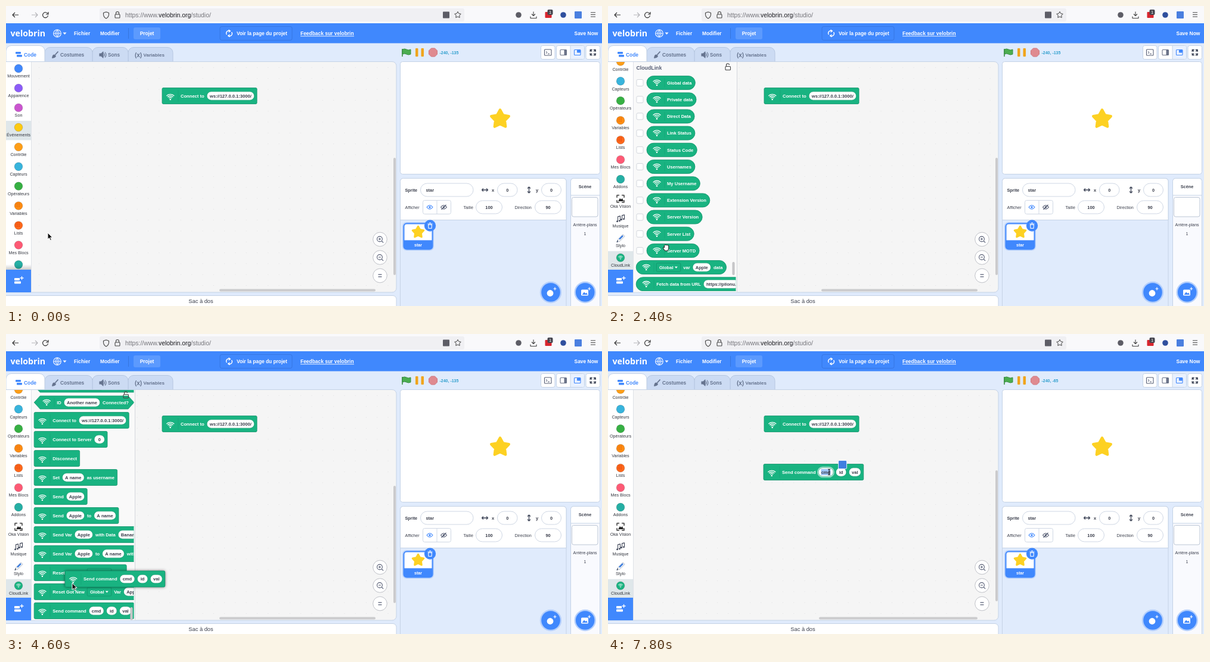
An HTML page with a canvas for the animation above (8 s loop, 1000x504 px).

```html
<!DOCTYPE html>
<html lang="fr">
<head>
<meta charset="utf-8">
<title>Studio de blocs</title>
<style>
html, body { margin: 0; width: 100%; height: 100%; overflow: hidden; }
canvas { display: block; }
</style>
</head>
<body>
<canvas id="stage" width="1000" height="504"></canvas>
<script>
const g = document.getElementById('stage').getContext('2d');
const SANS = '"Liberation Sans", Arial, sans-serif';
const BLUE = '#4088fd', PALE = '#e0ebfc', INK = '#3b3f4c', LINE = '#c5d3e6';
const GREEN = ['#19b381', '#11926a'], YELLOW = ['#fdb903', '#d79c05'], ORANGE = ['#fe9f18', '#d57f0b'];

// Drawing helpers
function paint(shape, fill, stroke, lw = 1) {
  if (fill) { g.fillStyle = fill; g.fill(shape); }
  if (stroke) { g.strokeStyle = stroke; g.lineWidth = lw; g.stroke(shape); }
}
function box(x, y, w, h, r, fill, stroke, lw) {
  const p = new Path2D();
  p.roundRect(x, y, w, h, r);
  paint(p, fill, stroke, lw);
}
function disc(x, y, r, fill, stroke, lw) {
  const p = new Path2D();
  p.arc(x, y, r, 0, 7);
  paint(p, fill, stroke, lw);
}
function path(d, x, y, fill, stroke, lw) {
  g.save();
  g.translate(x, y);
  paint(new Path2D(d), fill, stroke, lw);
  g.restore();
}
function text(s, x, y, size, color, bold = true, align = 'left', font = SANS) {
  g.font = `${bold ? 'bold ' : ''}${size}px ${font}`;
  g.textAlign = align;
  g.fillStyle = color;
  g.fillText(s, x, y + size * .36);
}
function clipped(x, y, w, h, draw) {
  g.save();
  g.beginPath();
  g.rect(x, y, w, h);
  g.clip();
  draw();
  g.restore();
}
function star(x, y, r, fill, stroke, lw) {
  const p = new Path2D();
  for (let i = 0; i < 10; i++) {
    const a = i * Math.PI / 5 - Math.PI / 2, d = i % 2 ? r * .53 : r;
    p.lineTo(x + d * Math.cos(a), y + d * Math.sin(a));
  }
  p.closePath();
  g.lineJoin = 'round';
  paint(p, fill, stroke, lw);
}
const flag = (x, y, k) => {
  g.save();
  g.translate(x, y);
  g.scale(k, k);
  path('M-7-5q4-2 7 0t7 0v8q-4 2-7 0t-7 0z', 0, 0, '#4cae50', '#3b8f43');
  path('M-7-6V7', 0, 0, null, '#3b8f43', 1.6);
  g.restore();
};

// Icons on blocks and in the category list
const icons = {
  wifi(x, y, color = '#fff') {
    disc(x, y + 4, 1.3, color);
    g.strokeStyle = color;
    g.lineWidth = 1.3;
    for (const r of [3.3, 6, 8.7]) {
      g.beginPath();
      g.arc(x, y + 4, r, -2.4, -.74);
      g.stroke();
    }
  },
  music(x, y, color = '#fff') {
    path('M-4 5v-8l4-1v7M3 2v-7l4-1v6', x, y, null, color, 1.1);
    for (const [dx, dy] of [[-5, 5], [-1, 4], [2, 2], [6, 1]]) disc(x + dx, y + dy, 1.4, color);
  },
  pen(x, y) {
    path('M-6 7l2-5 8-8 3 3-8 8z', x, y, '#fff', '#8795ab', .7);
    path('M-2 2l6-6', x, y, null, '#3f7fe0', 2.6);
    path('M-6 7l1.500-3', x, y, null, '#33415c', 1.3);
  }
};

// Blocks: (value)  [menu]  {round menu}
const LEAD = { stack: 31, reporter: 34, bool: 38, hat: 4.5 };
const ICON_X = { stack: 13.7, reporter: 17, bool: 21 };
const TAIL = { stack: 4.5, hat: 4.5, reporter: 6, bool: 9 };
const GAP = 4.4;

function layout(label, lead) {
  g.font = `bold 7.6px ${SANS}`;
  let x = lead;
  const parts = label.match(/\([^)]*\)|\[[^\]]*\]|\{[^}]*\}|[^([{]+/g)
    .map(s => s.trim()).filter(Boolean).map(s => {
      const kind = '([{'.includes(s[0]) ? s[0] : '';
      const word = kind ? s.slice(1, -1) : s;
      let w = g.measureText(word).width;
      if (word === '~') w = 19;
      else if (word === 'flag') w = 10;
      else if (kind === '(') w = Math.max(17.5, w + 9.4);
      else if (kind) w += 17;
      const part = { kind, word, x, w };
      x += w + GAP;
      return part;
    });
  return { parts, end: x - GAP };
}

function block(x, y, shape, [fill, edge], icon, label, edit) {
  const { parts, end } = layout(label, icon ? LEAD[shape] : LEAD.hat);
  const w = end + TAIL[shape], h = shape === 'stack' && icon ? 27 : 23, top = y - h / 2;
  if (shape === 'bool') path(`M10-11H${w - 10}L${w} 0 ${w - 10} 11H10L0 0z`, x, y, fill, edge, .8);
  else if (shape === 'hat') path(`M0-9C8-22 36-22 46-11.500H${w - 2}q2 0 2 2v19q0 2-2 2H2q-2 0-2-2z`, x, y, fill, edge, .8);
  else box(x, top, w, h, shape === 'reporter' ? h / 2 : 2, fill, edge, .8);
  if (icon) {
    icons[icon](x + ICON_X[shape], y + (shape === 'stack' ? 2 : 0));
    g.fillStyle = edge + '66';
    g.fillRect(x + LEAD[shape] - 4.5, top + 4, .8, h - 8);
  }
  parts.forEach(({ kind, word, x: dx, w: pw }) => {
    const px = x + dx;
    if (word === 'flag') return flag(px + 5, y + .5, .6);
    if (kind === '(') {
      box(px, y - 7.2, pw, 14.4, 7.2, word === '~' ? '#4fd0a8' : '#fff', edge, .6);
      if (word === '~') return box(px + 1, y - 6.2, pw - 2, 12.4, 6.2, null, '#a9ecd6', .8);
      if (edit && word === 'cmd') {
        box(px - 1, y - 8.2, pw + 2, 16.4, 8.2, null, '#ffffff88', 2);
        g.fillStyle = '#9fc5f8';
        g.fillRect(px + 4.500, y - 5, pw - 9, 10);
      }
      text(word, px + pw / 2, y, 7.6, INK, true, 'center');
    } else {
      if (kind) {
        box(px, y - 7.2, pw, 14.4, kind === '{' ? 7.2 : 2, kind === '{' ? edge : null, edge, .8);
        path('M-2.500-1.200h5L0 1.800z', px + pw - 7.5, y, '#fff');
      }
      text(word, px + (kind ? 4.7 : 0), y, 7.6, '#fff');
    }
  });
}

// Palette, measured from the scroll position of the last section
const rows = [];
function add(y, step, shape, color, icon, ...labels) {
  labels.forEach((label, i) => rows.push({ y: y + i * step, shape, color, icon, label }));
}
const EVENTS = -4168, MUSIC = -490, END = 521;
add(EVENTS + 105, 0, 'title', 0, 0, 'Événements');
add(EVENTS + 138.5, 35.7, 'hat', YELLOW, 0, 'quand {flag} est cliqué', 'quand la touche [espace] est pressée',
  'quand ce sprite est cliqué', "quand l'arrière-plan bascule sur [backdrop1]");
add(EVENTS + 293, 46.7, 'hat', YELLOW, 0, 'quand le [volume sonore] > (10)', 'quand je reçois [message1]');
add(EVENTS + 368, 28.3, 'stack', YELLOW, 0, 'envoyer à tous {message1}', 'envoyer à tous {message1} et attendre');
add(EVENTS + 434, 0, 'title', 0, 0, 'Contrôle');
add(EVENTS + 460, 28.5, 'stack', ORANGE, 0, 'attendre (1) secondes', 'répéter');
add(MUSIC + 82, 32, 'stack', GREEN, 'music', 'faire une pause pendant (0.25) temps',
  'jouer la note (60) pendant (0.25) temps', "choisir l'instrument n° {(1) Piano}",
  'mettre le tempo à (60)', 'ajouter (20) au tempo');
add(MUSIC + 240, 0, 'check', GREEN, 'music', 'tempo');
add(MUSIC + 266, 0, 'title', 0, 0, 'Stylo');
add(MUSIC + 294.5, 32, 'stack', GREEN, 'pen', 'effacer tout', 'estampiller', "stylo en position d'écriture",
  'relever le stylo', 'mettre la couleur du stylo à (~)', 'ajouter (10) à la {couleur} du stylo',
  'mettre la {couleur} du stylo à (50)', 'ajouter (1) à la taille du stylo', 'mettre la taille du stylo à (1)');
add(103.5, 0, 'title', 0, 0, 'CloudLink');
add(129, 28.2, 'check', GREEN, 'wifi', 'Global data', 'Private data', 'Direct Data', 'Link Status', 'Status Code',
  'Usernames', 'My Username', 'Extension Version', 'Server Version', 'Server List', 'Server MOTD');
add(439, 28.2, 'reporter', GREEN, 'wifi', '[Global] var (Apple) data', 'Fetch data from URL (https://pilonu.github.io/)');
add(495.5, 28.1, 'bool', GREEN, 'wifi', 'Connected?', 'Lost Connection?', 'Username Synced?', 'Got New [Global] Data?',
  'Got New [Global] Var (Apple)?', 'ID (Another name) Connected?');
add(END + 145, 32, 'stack', GREEN, 'wifi', 'Connect to (ws://127.0.0.1:3000/)', 'Connect to Server (0)', 'Disconnect',
  'Set (A name) as username', 'Send (Apple)', 'Send (Apple) to (A name)', 'Send Var (Apple) with Data (Banana)',
  'Send Var (Apple) to (A name) with Data (Banana)', 'Reset Got New [Global] Data', 'Reset Got New [Global] Var (Apple)',
  'Send command (cmd) (id) (val)');

const categories = [['Mouvement', '#4088fd'], ['Apparence', '#8c5cf8'], ['Son', '#ca55cf'], ['Événements', '#fdca12'],
  ['Contrôle', '#fe9e17'], ['Capteurs', '#38b4dc'], ['Opérateurs', '#36b043'], ['Variables', '#fe8c12', '#df620e'],
  ['Lists', '#fe681b', '#d83c0b'], ['Mes Blocs', '#fd5a75'], ['Addons', '#25afa4'], ['Oka Vision'], ['Musique'], ['Stylo'],
  ['CloudLink', '#19b381']];

// Motion: [time, value...] with linear travel between
function track(keys, t) {
  const i = keys.findIndex(k => k[0] > t);
  if (i < 0) return keys[keys.length - 1].slice(1);
  const a = keys[i - 1], b = keys[i], k = (t - a[0]) / (b[0] - a[0]);
  return a.slice(1).map((v, j) => v + (b[j + 1] - v) * k);
}
const mouseKeys = [[0, 70, 382], [200, 40, 387], [600, 26, 392], [1000, 25, 396], [1400, 21, 421], [1800, 21, 422],
  [2000, 50, 415], [2400, 97, 406], [3200, 97, 405], [3600, 88, 430], [4000, 59, 472], [4400, 62, 469], [4800, 160, 370],
  [5200, 265, 251], [5400, 272, 241], [5600, 273, 240], [6200, 273, 240], [6800, 362, 234], [7000, 371, 232]];
const slideKeys = [[0, -176], [200, -176], [400, -50], [600, -1.5], [800, 0], [4800, 0], [5000, -55], [5200, -145], [5400, -176]];
const listKeys = [[0, 0], [400, 0], [600, 27], [800, 105], [1000, 143.5]];
const scrollKeys = [[0, EVENTS], [1400, EVENTS], [1600, MUSIC], [1800, 0], [2400, 0], [2600, 110], [2800, 310], [3000, 470], [3200, END]];

function browserBar() {
  g.fillStyle = '#f9f9fb';
  g.fillRect(0, 0, 1000, 29);
  box(157, 4, 612, 22, 3, '#f0f0f3');
  path('M10 0H0M4-4L0 0l4 4', 11, 15, null, '#333', 1.2);
  path('M-10 0H0M-4-4L0 0l-4 4', 53, 15, null, '#b4b4b8', 1.2);
  path('M4-2A4.500 4.500 0 1 0 4.500 1M5-5v4H1', 66, 15, null, '#333', 1.2);
  path('M0-5l4.500 1.500v3Q4 4 0 6-4 4-4.500-.500v-3z', 168, 15, null, '#444', 1.1);
  box(183, 14, 8, 6, 1, null, '#444', 1.1);
  path('M-2.500 0v-2a2.500 2.500 0 0 1 5 0v2', 187, 14, null, '#444', 1.1);
  text('https://www.', 200, 15, 10.4, '#77777d', false);
  const x = 200 + g.measureText('https://www.').width;
  text('velobrin.org', x, 15, 10.4, '#1b1b20', false);
  text('/studio/', x + g.measureText('velobrin.org').width, 15, 10.4, '#77777d', false);
  box(733, 9.5, 11, 11, 1, '#5d5d66');
  star(758, 15, 5.5, null, '#444', 1);
  disc(860, 15, 4.8, '#5d5d66');
  path('M0-5v7M-3-1l3 3 3-3M-5 3v3H5V3', 885, 14.5, null, '#444', 1.1);
  box(904.5, 10, 11, 10, 1, '#d8262f');
  box(908.5, 6, 9, 9, 2, '#45454e');
  text('1', 913, 10.500, 7.5, '#fff', false, 'center');
  disc(935, 15, 4.8, '#2f4f9e');
  box(954, 9, 12, 12, 1, '#4a7fe0');
  path('M0 0h8M0 3.500h8M0 7h8', 981, 11, null, '#444', 1.1);
}

function menuBar() {
  g.fillStyle = BLUE;
  g.fillRect(0, 29, 1000, 33.5);
  text('velobrin', 7.5, 46, 14.2, '#fff', true, 'left', '"Open Sans", sans-serif');
  disc(86, 46, 6.3, null, '#fff', 1.1);
  path('M-6 0H6M0-6V6M0-6q-6 6 0 12M0-6q6 6 0 12', 86, 46, null, '#fff', .9);
  path('M-3-1.500h6L0 2z', 98.5, 46, '#fff');
  text('Fichier', 114, 46, 8.3, '#fff');
  text('Modifier', 158, 46, 8.4, '#fff');
  path('M0-9V9', 205.500, 46, null, '#3675dd', 1);
  box(214, 36, 45, 20, 3, '#5c9afe');
  text('Projet', 236.5, 46, 8.4, '#fff', true, 'center');
  box(359, 34.5, 121, 23, 3, null, '#3777e3');
  path('M-4 2A4 4 0 0 1 1-4M4-2A4 4 0 0 1-1 4M-1-6l3 2-3 2M1 6l-3-2 3-2', 374.5, 46, null, '#fff', 1.4);
  text('Voir la page du projet', 387, 46, 8.35, '#fff');
  text('Feedback sur velobrin', 494, 46, 8.45, '#fff');
  g.fillRect(494, 50.3, 90, .9);
  text('Save Now', 953.5, 46, 8.45, '#fff');
}

function tabs() {
  for (const [x, w] of [[205, 75], [145, 60], [65, 80]]) box(x, 69.5, w, 30, [9, 9, 0, 0], '#ccdbf3', '#b6c7e1');
  box(0, 66.5, 65, 34, [9, 9, 0, 0], '#fff', LINE);
  box(16, 77, 9, 3.6, 1, BLUE);
  box(18, 82, 9, 3.6, 1, BLUE);
  text('Code', 30, 81.5, 8.4, BLUE);
  const dim = '#66748f';
  path('M-5 5q1-6 4-4t-4 4zM-.500 0l5-5.500', 83, 82, dim, dim, 1.8);
  text('Costumes', 91, 82.500, 8.3, dim);
  path('M-5-2h3l3-3V5l-3-3h-3zM2.500-2.500q2 2.500 0 5M4-4.500q4 4.500 0 9', 162, 82, null, dim, 1.1);
  path('M-5-2h3l3-3V5l-3-3h-3z', 162, 82, dim);
  text('Sons', 171, 82.5, 8.2, dim);
  text('(x)', 222, 82, 10, dim, true, 'center');
  text('Variables', 230.5, 82.500, 8.1, dim);
}

function workspace(dropped) {
  box(-5, 93.500, 660, 387.500, [0, 7, 7, 0], '#f5f5f5', LINE);
  g.fillStyle = '#e1e1e3';
  for (let x = 55; x < 645; x += 18.3)
    for (let y = 103; y < 478; y += 18.3) g.fillRect(x, y, 1, 1);
  box(650, dropped ? 229 : 255, 4, dropped ? 220 : 197, 2, '#cbcbcd');
  box(dropped ? 354 : 358, 475.500, dropped ? 266 : 262, 4, 2, '#cbcbcd');
  for (const y of [392, 422.5, 453]) disc(627.5, y, 11.8, '#fff', '#bfc1c7');
  for (const [y, d] of [[392, 'M-2 0h4M0-2v4'], [422.5, 'M-2 0h4']]) {
    disc(627, y - .5, 4.4, null, '#575e75', 1.1);
    path(d + 'M3 3l3.200 3.200', 627, y - .5, null, '#575e75', 1.1);
  }
  path('M-3-1.800h6M-3 1.800h6', 627.5, 453, null, '#575e75', 1.3);
  box(-5, 486.5, 660, 30, [0, 6, 0, 0], '#fff', LINE);
  text('Sac à dos', 327, 496, 9.3, INK, false, 'center');
  block(262, 151, 'stack', GREEN, 'wifi', 'Connect to (ws://127.0.0.1:3000/)');
}

function flyout(slide, scroll) {
  if (slide <= -175) return;
  clipped(42, 94, 175 + slide, 386.5, () => {
    g.translate(slide, 0);
    g.fillStyle = '#f9f9f9';
    g.fillRect(42, 94, 175, 387);
    g.fillStyle = '#d5d7dc';
    g.fillRect(216, 94, 1, 387);
    clipped(42, 94, 172.500, 385, () => {
      for (const { y: home, shape, color, icon, label } of rows) {
        const y = home - scroll;
        if (y < 70 || y > 510) continue;
        if (shape === 'title') text(label, 47.5, y, 8.75, '#575e75');
        else if (shape === 'check') {
          box(48, y - 5.5, 11, 11, 2, '#fff', '#d3d6dc');
          block(65, y, 'reporter', color, icon, label);
        } else block(47.2, y, shape, color, icon, label);
      }
    });
    box(197, 101.500, 8.500, 6, 1, null, '#444', 1.1);
    path('M-2.500 0v-2a2.500 2.500 0 0 1 5-.500', 201, 101.5, null, '#444', 1.1);
    box(208.4, 430 + scroll * .0557, 4.2, 22, 2, '#c6c6c8');
  });
}

function categoryList(scroll, selected, mx, my) {
  g.fillStyle = '#fff';
  g.fillRect(0, 94, 42, 349);
  g.fillStyle = '#dfe2e8';
  g.fillRect(42, 94, 1, 387);
  clipped(0, 94, 42, 349, () => categories.forEach(([name, color, dots], i) => {
    const y = 105 + i * 32.95 - scroll;
    const hover = mx < 42 && my > y - 11 && my < y + 21.5;
    if (name === selected) {
      g.fillStyle = '#dfe7ea';
      g.fillRect(0, y - 11, 42, 32.5);
    }
    if (color) disc(21, y, 6.9, color, '#00000030', .8);
    if (dots)
      for (let a = -4; a <= 4; a += 2.7)
        for (let b = -4; b <= 4; b += 2.7) disc(21 + a, y + b, .75, dots);
    if (name === 'Oka Vision') {
      path('M-6-2v-4h4M2-6h4v4M6 2v4H2M-2 6h-4V2', 21, y, null, '#222', 1.3);
      path('M-4 4l3-5 2 2 2-2 2 5z', 21, y, '#222');
    }
    if (name === 'Musique') icons.music(20.5, y, '#3f4658');
    if (name === 'Stylo') icons.pen(21, y);
    if (name === 'CloudLink') {
      g.save();
      g.translate(21, y);
      g.scale(.6, .6);
      icons.wifi(0, 0);
      g.restore();
    }
    text(name, 21, y + 12.7, 7.2, hover ? BLUE : '#33363f', false, 'center');
  }));
  if (scroll < 100) {
    const fade = g.createLinearGradient(0, 434, 0, 443);
    fade.addColorStop(0, '#0000');
    fade.addColorStop(1, '#0003');
    g.fillStyle = fade;
    g.fillRect(0, 434, 42, 9);
  }
  g.fillStyle = BLUE;
  g.fillRect(0, 443, 42, 38);
  box(14, 457, 9, 4, 1, '#fff');
  box(14, 462.5, 11, 4, 1, '#fff');
  path('M0-3v6M-3 0h6', 26.5, 457, null, '#fff', 1.3);
}

function stagePanel(mouseY) {
  flag(672, 78, 1);
  box(687, 71, 4.5, 14, 1, '#f0a51c');
  box(696.5, 71, 4.5, 14, 1, '#f0a51c');
  path('M-3-7h6l4 4v6l-4 4h-6l-4-4v-6z', 716.5, 78, '#df8a90', '#d0777f');
  const y = Math.max(-135, -Math.round((mouseY - 186.5) / .7));
  text(`-240, ${y}`, 727.5, 78, 7, '#2f9fce');
  for (const [x, w] of [[897.5, 23.5], [923.5, 47], [973, 23.5]]) box(x, 66.5, w, 23, 3, '#fff', LINE);
  box(947, 67, 23, 22, [0, 3, 3, 0], '#e9f1fe');
  path('M0-11.500v23', 947, 78, null, LINE);
  box(903.500, 73, 11.500, 10, 1, null, '#575e75', 1.1);
  path('M-3-2l2 2-2 2M0 2.500h3', 909, 78, null, '#575e75', 1);
  box(930, 73.500, 10.500, 9, 1, null, '#6b7388', 1.1);
  box(936.5, 73.5, 4, 9, 1, '#6b7388');
  box(953.5, 73.5, 10.500, 9, 1, null, BLUE, 1.1);
  box(958, 73.5, 6, 5, 1, BLUE);
  path('M-4.500-1v-3.500H-1M1-4.500h3.500V-1M4.500 1v3.500H1M-1 4.500h-3.500V1M-4.500-4.500l3 3M4.500-4.500l-3 3M4.500 4.500l-3-3M-4.500 4.500l3-3', 984.7, 78, null, '#3f4658', 1.3);
  box(661.5, 93.5, 335, 189, 4, '#fff', LINE);
  star(829, 190, 15.5, '#fdd123', '#fdd123', 4.5);
}

function field(x, y, w, value, left) {
  box(x, y - 11, w, 22, 11, '#fff', '#cfd7e4');
  text(value, left ? x + 9 : x + w / 2, y, 7.4, INK, true, left ? 'left' : 'center');
}

function spritePanel() {
  box(661.5, 289.5, 278.5, 230, 5, PALE, LINE);
  box(661.5, 289.5, 278.5, 70, [5, 5, 0, 0], '#fff', LINE);
  text('Sprite', 669.5, 309, 7.3, INK);
  field(695.5, 309, 88.500, 'star', true);
  path('M-5 0H5M-2.500-2.500L-5 0l2.500 2.500M2.500-2.500L5 0 2.500 2.500', 803.5, 309, null, '#3f4658', 1.3);
  text('x', 815, 309, 7.4, INK);
  field(824.5, 309, 33.500, '0');
  path('M0-5V5M-2.500-2.500L0-5l2.500 2.500M-2.500 2.500L0 5l2.500-2.500', 877.5, 309, null, '#3f4658', 1.3);
  text('y', 889, 309, 7.4, INK);
  field(898.5, 309, 33, '0');
  text('Afficher', 669.5, 338, 7.2, INK, false);
  box(699.5, 326.5, 47, 23, 3, '#fff', '#cfd7e4');
  path('M0-11.500v23', 723, 338, null, '#cfd7e4');
  for (const [x, color] of [[711, BLUE], [734.5, '#575e75']]) {
    path('M-5 0q5-6.500 10 0-5 6.500-10 0z', x, 338, null, color, 1.2);
    disc(x, 338, 1.7, color);
  }
  path('M-4 4l8-8', 734.5, 338, null, '#575e75', 1.2);
  text('Taille', 767.5, 338, 7.2, INK, false);
  field(788.5, 338, 44, '100');
  text('Direction', 853.5, 338, 7.2, INK, false);
  field(887.5, 338, 44, '90');

  box(665, 363, 53, 48, 7, '#b9d2fb');
  box(667.5, 365.5, 48, 43, 5, '#fff', BLUE, 2);
  box(667, 393.5, 49, 15.5, [0, 0, 5, 5], BLUE);
  star(691.5, 380, 9.8, '#fdd123', '#fdd123', 3);
  text('star', 691.5, 401, 7.2, '#fff', true, 'center');
  disc(711.5, 369, 9.7, BLUE);
  path('M-4-3h8M-1.500-4.500h3M-3-1.500l.500 6h5l.500-6z', 711.5, 369, null, '#fff', 1.1);

  box(947.5, 289.5, 49, 230, 5, '#f9fafe', LINE);
  box(947.5, 289.5, 49, 28.500, [5, 5, 0, 0], '#fff', LINE);
  text('Scène', 971.5, 303, 7.3, INK, true, 'center');
  box(949.5, 321.5, 43.500, 32.5, 3, '#fff', '#bcc6d5');
  text('Arrière-plans', 971.5, 367, 7, INK, false, 'center');
  text('1', 971.5, 382.5, 7, INK, false, 'center');
  for (const x of [914, 971.7]) {
    disc(x, 481, 18.2, '#b4cffc');
    disc(x, 481, 15.8, BLUE);
    path('M0-2.500v5M-2.500 0h5', x + 7, 475, null, '#fff', 1.2);
  }
  disc(913, 482.5, 5.4, '#fff');
  box(965, 476.500, 12, 10, 1.5, '#fff');
  path('M-4.500 3.500l3.500-4.500 2.500 2.500 1.500-1.500 2 3.500z', 971, 481.500, BLUE);
}

function cursor(t, x, y) {
  g.lineJoin = 'round';
  if (t < 400 || (t >= 4400 && t < 6800)) path('M0 0v11l2.600-2.300 1.800 4 1.900-.900-1.800-3.800h3.500z', x, y - 1, '#111', '#fff', 1);
  else if (t < 2000) path('M-1 1q1-2 2 0v4l4.500 1q2 .500 2 2v2l-1.500 3.500h-5.500l-4-5.500q.500-1.800 2.500 0z', x, y, '#fff', '#111', 1);
  else if (t < 4400) path('M-2.500 0v-4q1-1.500 1.800 0 .800-2 1.900 0 1-1.500 1.800.200 1.500-1 1.800.500v4.500l-1.500 4h-5l-3-5q0-1.500 2.200-.200z', x, y, '#fff', '#111', 1);
  else path('M-2-5q2 0 2 1.500v7Q0 5-2 5M2-5Q0-5 0-3.500M0 3.500Q0 5 2 5', x, y, null, '#222', 1.1);
}

function draw(t) {
  const [mx, my] = track(mouseKeys, t);
  const [slide] = track(slideKeys, t), [scroll] = track(scrollKeys, t), [list] = track(listKeys, t);
  const dragging = t >= 4400 && t < 5800, dropped = t >= 5800;
  const command = 'Send command (cmd) (id) (val)';
  g.fillStyle = PALE;
  g.fillRect(0, 0, 1000, 504);
  browserBar();
  menuBar();
  tabs();
  workspace(dropped);
  if (dropped) block(261, 232, 'stack', GREEN, 'wifi', command, t >= 7000);
  flyout(slide, scroll);
  if (dragging) {
    g.save();
    g.shadowColor = '#0009';
    g.shadowBlur = 5;
    box(mx - 12, my - 21.5, 167.5, 27, 2, GREEN[0]);
    g.restore();
    block(mx - 12, my - 8, 'stack', GREEN, 'wifi', command);
  }
  categoryList(list, t < 1600 ? 'Événements' : 'CloudLink', mx, my);
  stagePanel(my);
  spritePanel();
  if (t >= 7200) box(386.5, 212.5, 14, 14, 1.5, '#3f7fe0', '#fff', .8);
  cursor(t, mx, my);
}

function tick() {
  draw(Math.floor(performance.now() % 8000 / 200) * 200);
  requestAnimationFrame(tick);
}
tick();
</script>
</body>
</html>
```
